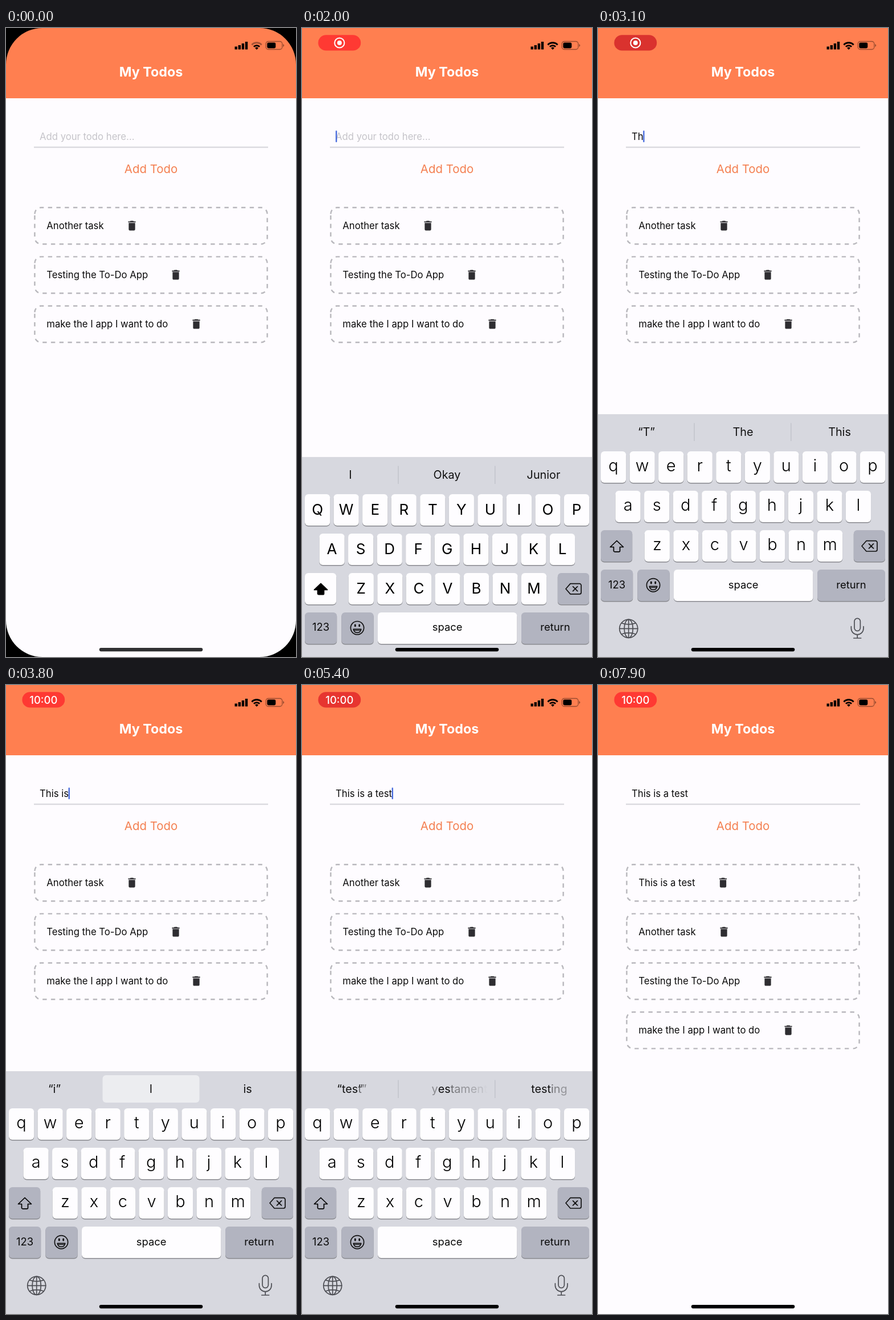
Animation of 509 by 1101 pixels, one loop 8 s. Source, as an HTML page:

```html
<!DOCTYPE html>
<html lang="en">
<head>
<meta charset="utf-8">
<title>My Todos</title>
<style>
  html, body { margin: 0; width: 100%; height: 100%; overflow: hidden; background: #fefcff; }
  svg { display: block; width: 100%; height: 100%; font-family: Inter, "Open Sans", sans-serif; }
  .title { font-size: 23.3px; font-weight: 700; fill: #fff; }
  .body { font-size: 16.7px; fill: #0a0a0a; }
  .hint { fill: #c5c4c9; }
  .add { font-size: 20.4px; fill: #f47f50; }
  .clock { font-size: 18.5px; font-weight: 500; fill: #fff; }
  .word { font-size: 19.8px; fill: #111; }
  .label { font-size: 18.4px; fill: #0a0a0a; }
  .lower { font-size: 29px; font-weight: 300; transform: translateY(-1.3px); }
  .upper { font-size: 26px; }
  .mid { text-anchor: middle; }
  .line { fill: none; stroke-linecap: round; stroke-linejoin: round; }
</style>
</head>
<body>
<svg viewBox="0 0 509 1101" preserveAspectRatio="none">
  <defs>
    <path id="bin" transform="scale(.94)" d="M-6 7c0 1.1.9 2 2 2h8c1.1 0 2-.9 2-2V-5H-6zM7-8H3.5l-1-1h-5l-1 1H-7v2H7z" fill="#2e2d31"/>
    <path id="frame" d="M50.4 325.4a11.1 11.1 0 0 1 11.1-11.1H447.5A11.1 11.1 0 0 1 458.6 325.4V367.1A11.1 11.1 0 0 1 447.5 378.2H61.5A11.1 11.1 0 0 1 50.4 367.1Z"
      fill="none" stroke="#b9b8bd" stroke-width="2.46" stroke-dasharray="7.376"/>
  </defs>
  <rect width="509" height="1101" fill="#fefcff"/>
  <rect width="509" height="123" fill="#ff7f50"/>
  <text class="title mid" x="254.5" y="85">My Todos</text>

  <g id="status">
    <path d="M403.7 37.5v-5M409.8 37.5v-7.5M415.9 37.5v-10.5M422 37.5v-13.5" stroke="#000" stroke-width="4.4"/>
    <path id="wifiTop" d="M431.4 29.4a12.1 12.1 0 0 1 17.2 0" fill="none" stroke="#000" stroke-width="2.9"/>
    <path d="M434.9 32.8a7.2 7.2 0 0 1 10.2 0" fill="none" stroke="#000" stroke-width="2.8"/>
    <path d="M440 38l-2.9-3a4.2 4.2 0 0 1 5.8 0z"/>
    <rect x="456.2" y="23.5" width="28.6" height="14" rx="4.2" fill="none" stroke="#000" stroke-opacity=".4" stroke-width="1.3"/>
    <rect x="458.3" y="25.6" width="15" height="9.8" rx="2.3"/>
    <path d="M486.3 28v5q1.8-.8 1.8-2.5t-1.8-2.5z" fill-opacity=".45"/>
  </g>
  <g id="pill">
    <rect id="pillBack" x="28.4" y="12.2" width="74.8" height="27.4" rx="13.7"/>
    <g id="record" fill="none" stroke="#fff" stroke-width="2">
      <circle cx="65.8" cy="26" r="8.6"/><circle cx="65.8" cy="26" r="4" fill="#fff" stroke="none"/>
    </g>
    <text id="clock" class="clock mid" x="65.8" y="32.7">10:00</text>
  </g>

  <text id="entry" class="body" x="59" y="196" xml:space="preserve"></text>
  <rect id="caret" y="179.5" width="2.4" height="20.5" rx="1.2" fill="#4a6ddd"/>
  <path d="M49 208.8H460" stroke="#dcdbe0" stroke-width="2.4"/>
  <text class="add mid" x="254.5" y="253.5">Add Todo</text>
  <g id="list"></g>

  <g id="keyboard">
    <rect y="676" width="509" height="430" fill="#d7d8df"/>
    <path id="rules" d="M169 691.5V723M338.8 691.5V723" stroke="#bdbfc7" stroke-width="1.2"/>
    <rect id="pick" x="169.5" y="683" width="170" height="48" rx="6" fill="#ecedf0"/>
    <g id="words" class="word"></g>
    <g id="keys"></g>
    <path id="shift" class="line" d="M33 897.5l11.5 11h-6v6.5a1.8 1.8 0 0 1-1.8 1.8h-7.4a1.8 1.8 0 0 1-1.8-1.8v-6.5h-6z" stroke="#000" stroke-width="1.7"/>
    <path class="line" d="M471 897.7H487a3 3 0 0 1 3 3V913a3 3 0 0 1-3 3H471L463 906.8ZM475.5 902.8l8 8m0-8l-8 8" stroke="#111" stroke-width="1.7"/>
    <g class="line" stroke="#111" stroke-width="1.7">
      <circle cx="97" cy="975.2" r="11.6"/>
      <path d="M90.2 977.4H103.8Q102.6 983.4 97 983.4T90.2 977.4Z"/>
      <path d="M91.5 979.4H102.5" stroke-width="1.2"/>
      <path d="M93.3 970v2M100.7 970v2" stroke-width="2.8"/>
    </g>
    <g class="line" stroke="#4d4e54" stroke-width="1.7">
      <circle cx="53.7" cy="1051.3" r="16"/><ellipse cx="53.7" cy="1051.3" rx="7.6" ry="16"/>
      <path d="M53.7 1035.3v32M37.7 1051.3h32M41.5 1041.6q12.2 4.6 24.4 0M41.5 1061q12.2-4.6 24.4 0"/>
      <rect x="450" y="1033.3" width="10.4" height="22" rx="5.2"/>
      <path d="M444.4 1047.5v3.5a10.8 10.8 0 0 0 21.6 0V1047.5M455.2 1061.8v6M448.8 1068h12.8"/>
    </g>
  </g>
  <rect id="home" x="163.7" y="1085" width="181.6" height="6.2" rx="3.1"/>
  <path id="corners" fill-rule="evenodd"/>
</svg>
<script>
const LOOP = 8000;
const $ = id => document.getElementById(id);
const clamp = v => Math.max(0, Math.min(1, v));
const mix = (a, b, p) => a + (b - a) * p;

// Typing: moment, text in the field, suggestions shown from then on
const steps = [
  [0, "", "I Okay Junior"],
  [2950, "T", "“T” The This"],
  [3100, "Th", "“Th” The This"],
  [3250, "Thi", "“Thi” This Things"],
  [3400, "This", "“This” This’ll Thistle"],
  [3500, "This ", "is was will"],
  [3640, "This i", "“i” I is"],
  [3790, "This is", "“i” I is"],
  [4000, "This is ", "a the not"],
  [4250, "This is a", "“a” an are"],
  [4450, "This is a ", "good great new"],
  [4750, "This is a t", "“t” to the"],
  [4950, "This is a te", "“te” the yes"],
  [5150, "This is a tes", "“tes” yes test"],
  [5325, "This is a test", "“test” testament testing"]
].map(([at, text, words]) => ({ at, text, words: words.split(" ") }));

const TASKS = [["This is a test", 219.5], ["Another task", 221], ["Testing the To-Do App", 298], ["make the I app I want to do", 334]];
const ADDED = 6300, OPEN = 1850, CLOSE = 7150;

const pen = document.createElement("canvas").getContext("2d");
const widthOf = s => {
  pen.font = '19.8px Inter, "Open Sans", sans-serif';
  return pen.measureText(s).width;
};

function key(x, y, w, label = "", cls = "label", dark = false, id = "") {
  const base = y + (cls === "label" ? 32.5 : 36.5);
  return `<rect x="${x}" y="${y + 1.6}" width="${w}" height="55" rx="6" fill="#898a8f"/>
    <rect ${id && `id="${id}"`} x="${x}" y="${y}" width="${w}" height="55" rx="6" fill="${dark ? "#b2b4c0" : "#fefdff"}"/>
    <text class="${cls} mid" x="${x + w / 2}" y="${base}">${label}</text>`;
}

const rows = [["qwertyuiop", 5, 741], ["asdfghjkl", 30.5, 810], ["zxcvbnm", 81.7, 879]];
$("keys").innerHTML = rows.map(([letters, x, y]) =>
  [...letters].map((c, i) => key(x + i * 50.55, y, 44.2, c, "lower")).join("")).join("") +
  key(5, 879, 55.2, "", "label", true, "shiftKey") + key(448.8, 879, 55.2, "", "label", true) +
  key(5, 948, 56.2, "123", "label", true) + key(69.3, 948, 56.4, "", "label", true) +
  key(133, 948, 244.4, "space") + key(385, 948, 119, "return", "label", true);
const letters = [...document.querySelectorAll(".lower")];

$("list").innerHTML = TASKS.map(([name, x]) =>
  `<g><use href="#frame"/><text class="body" x="71.3" y="351.7">${name}</text><use href="#bin" x="${x}" y="346"/></g>`).join("");
const tasks = [...$("list").children];

// Longest run of letters two words share
function shared(a, b) {
  for (let n = Math.min(a.length, b.length); n > 0; n--)
    for (let i = 0; i + n <= a.length; i++)
      if (b.includes(a.substr(i, n))) return a.substr(i, n);
  return "";
}

const glyphs = (s, x, alpha, end) => s &&
  `<text x="${x}" y="714" ${end ? 'text-anchor="end"' : ""}>${[...s].map((c, i) =>
    `<tspan fill-opacity="${clamp(alpha(i))}">${c}</tspan>`).join("")}</text>`;

// The shared letters slide; the others fade out and in around them
function morph(from, to, cx, p) {
  if (p >= 1 || from === to) return `<text class="mid" x="${cx}" y="714">${to}</text>`;
  const keep = shared(from, to), size = widthOf(keep);
  const split = w => {
    const i = w.indexOf(keep), head = w.slice(0, i);
    return { head, tail: w.slice(i + keep.length), x: cx - widthOf(w) / 2 + widthOf(head) };
  };
  const a = split(from), b = split(to), x = mix(a.x, b.x, p);
  return glyphs(a.head, x, () => 1 - 2 * p, true) + glyphs(b.head, x, () => 2 * p - 1, true) +
    glyphs(keep, x, () => 1) + glyphs(a.tail, x + size, () => 1 - p) +
    glyphs(b.tail, x + size, i => p * 1.8 - i * .15 * (1 - p));
}

const settle = s => s <= 0 ? 1 : Math.exp(-21 * s) * (1 + 21 * s);

function drawPill(t) {
  const glow = (1 + Math.cos(t * Math.PI / 1000)) / 2;
  const tone = (a, b) => Math.round(mix(a, b, clamp(glow * 1.08)));
  $("pillBack").setAttribute("fill", `rgb(${tone(217, 255)},${tone(50, 57)},${tone(46, 51)})`);
  $("pill").setAttribute("opacity", clamp((t - 450) / 250));
  $("record").setAttribute("opacity", t < 3200 ? 1 : 0);
  $("clock").setAttribute("opacity", t < 3200 ? 0 : 1);
}

function drawEntry(t, text) {
  const entry = $("entry");
  entry.textContent = text || "Add your todo here...";
  entry.setAttribute("class", text ? "body" : "body hint");
  $("caret").setAttribute("x", text ? 58.5 + entry.getComputedTextLength() : 59);
  const beat = (t - 5600) % 1000;
  const blink = t < 5600 ? 1 : beat < 600 ? clamp((600 - beat) / 140) : clamp((beat - 900) / 100);
  $("caret").setAttribute("opacity", t < OPEN || t > CLOSE ? 0 : blink);
}

function drawKeyboard(t, now, before) {
  const off = t < CLOSE ? settle((t - OPEN) / 1000) : 1 - settle((t - CLOSE) / 1000);
  $("keyboard").setAttribute("transform", `translate(0 ${off * 428})`);
  const caps = now === steps[0], pick = now.words[1] === "I";
  for (const el of letters) {
    const c = el.textContent;
    el.textContent = caps ? c.toUpperCase() : c.toLowerCase();
    el.setAttribute("class", caps ? "upper mid" : "lower mid");
  }
  $("shiftKey").setAttribute("fill", caps ? "#fefdff" : "#b2b4c0");
  $("shift").style.fill = caps ? "#000" : "none";
  $("pick").setAttribute("opacity", pick ? 1 : 0);
  $("rules").setAttribute("opacity", pick ? 0 : 1);
  const p = clamp((t - now.at) / 250);
  $("words").innerHTML = now.words.map((w, i) => morph(before.words[i], w, 85 + i * 169.5, p)).join("");
}

function draw(t) {
  let n = steps.length - 1;
  while (steps[n].at > t) n--;
  const now = steps[n], before = steps[Math.max(0, n - 1)];
  drawPill(t);
  drawEntry(t, now.text);
  drawKeyboard(t, now, before);

  const added = t >= ADDED;
  tasks.forEach((el, i) => {
    el.setAttribute("transform", `translate(0 ${86.06 * (added ? i : i - 1)})`);
    el.setAttribute("display", i || added ? "inline" : "none");
  });

  const intro = clamp((t - 50) / 400), r = 64 * (1 - intro);
  const dark = Math.round(48 * (1 - intro));
  $("home").setAttribute("fill", `rgb(${dark},${dark},${dark + 2})`);
  $("wifiTop").setAttribute("stroke-opacity", t < 1100 ? .35 : 1);
  $("corners").setAttribute("d", `M0 0H509V1101H0ZM${r} 0H${509 - r}A${r} ${r} 0 0 1 509 ${r}V${1101 - r}` +
    `A${r} ${r} 0 0 1 ${509 - r} 1101H${r}A${r} ${r} 0 0 1 0 ${1101 - r}V${r}A${r} ${r} 0 0 1 ${r} 0Z`);
}

const start = performance.now();
function tick() {
  draw((performance.now() - start) % LOOP);
  requestAnimationFrame(tick);
}
tick();
</script>
</body>
</html>
```
